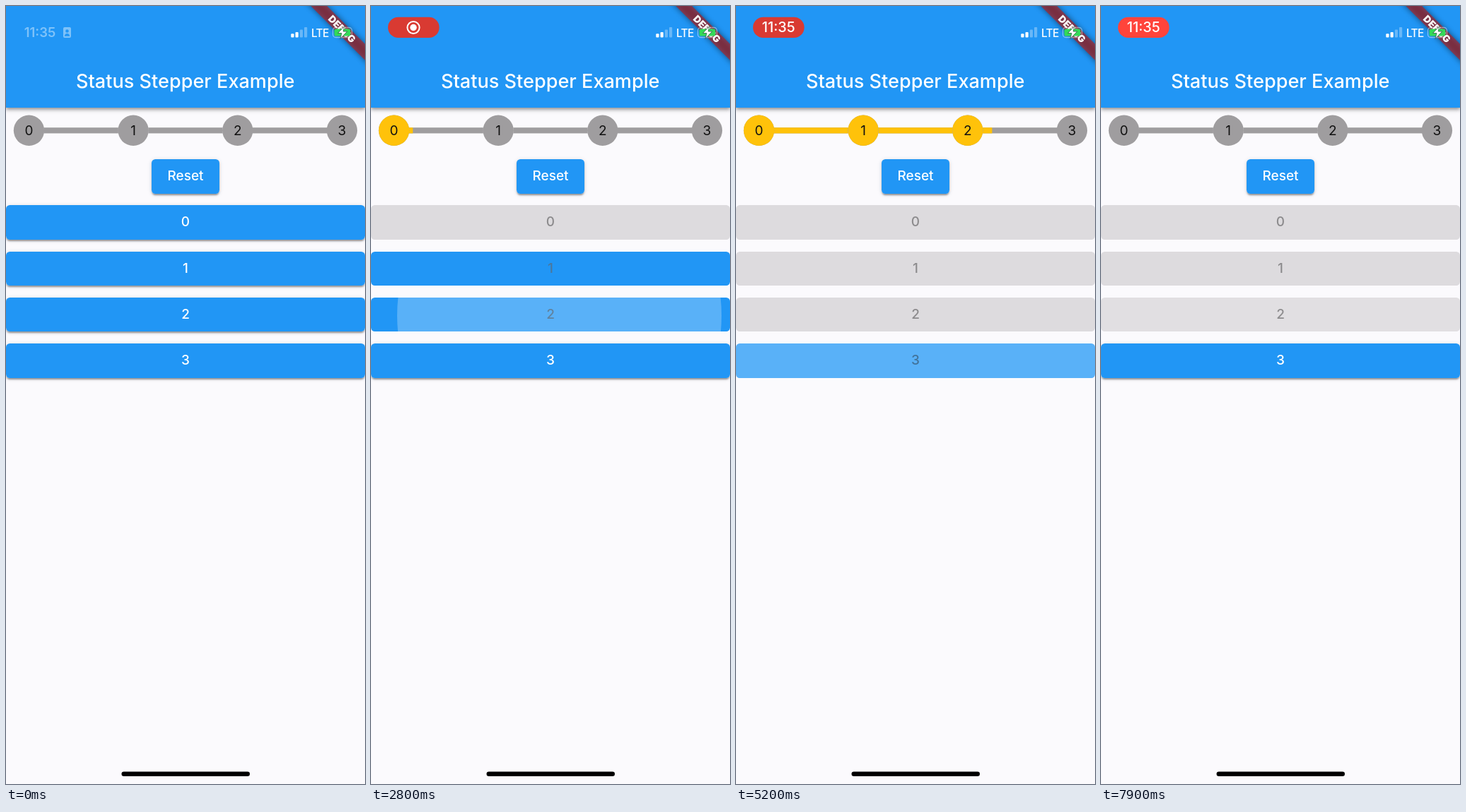
Recreate the animation shown at these times as an HTML page. Size 508x1102 px, loop 8 s.

```html
<!DOCTYPE html>
<html lang="en">
<head>
<meta charset="utf-8">
<title>Status Stepper Example</title>
<style>
html, body { margin: 0; width: 100%; height: 100%; overflow: hidden; background: #fbfafd; }
#stage { position: absolute; left: 0; top: 0; width: 508px; height: 1102px; overflow: hidden; font-family: Inter, Roboto, sans-serif; }
#bar { position: absolute; left: 0; top: 0; width: 508px; height: 143.5px; background: #2196f5; box-shadow: 0 2px 5px rgba(0,0,0,.36), 0 4px 6px rgba(0,0,0,.12); }
svg { position: absolute; left: 0; top: 0; }
.shade, .btn { position: absolute; height: 48.8px; border-radius: 5.4px; }
.shade { box-shadow: 0 3px 2px -1px rgba(0,0,0,.24), 0 2px 3px rgba(0,0,0,.16), 0 1px 6px rgba(0,0,0,.12); }
.btn { overflow: hidden; background: #2196f5; color: #fff; font-size: 19px; font-weight: 500; line-height: 48.8px; text-align: center; }
.ink { position: absolute; border-radius: 50%; background: #fff; opacity: 0; }
.btn span { position: relative; }
</style>
</head>
<body>
<div id="stage">
  <div id="bar"></div>
  <svg id="art" width="508" height="1102" viewBox="0 0 508 1102" font-family="Inter, Roboto, sans-serif">
    <defs>
      <filter id="soft" x="-20%" y="-100%" width="140%" height="300%"><feGaussianBlur stdDeviation="4"/></filter>
    </defs>
    <text x="253.7" y="115.5" font-size="27.1" font-weight="500" fill="#fff" text-anchor="middle">Status Stepper Example</text>
    <g id="steps"></g>
    <rect x="163.5" y="1084.5" width="181.5" height="6.6" rx="3.3"/>

    <g transform="translate(508 0) rotate(45)">
      <rect x="-90" y="38" width="180" height="16.2" opacity=".5" filter="url(#soft)"/>
      <rect x="-90" y="38" width="180" height="16.2" fill="#b71c1c" fill-opacity=".627"/>
      <text y="51" font-size="13.8" font-weight="900" fill="#fff" text-anchor="middle">DEBUG</text>
    </g>

    <g fill="#fff">
      <rect x="403.3" y="39.3" width="4.2" height="5.2" rx="1"/>
      <rect x="409.5" y="37" width="4.2" height="7.5" rx="1"/>
      <rect x="415.8" y="33.4" width="4.2" height="11.1" rx="1" opacity=".32"/>
      <rect x="422" y="30" width="4.2" height="14.5" rx="1" opacity=".32"/>
      <text x="432" y="43.6" font-size="15.4" font-weight="500" letter-spacing="-.7">LTE</text>
    </g>
    <rect x="462.5" y="30.5" width="27" height="14" rx="4.3" fill="none" stroke="#fff" stroke-opacity=".45" stroke-width="1.3"/>
    <rect x="464.6" y="32.5" width="22.8" height="10" rx="2.6" fill="#34d958"/>
    <path d="M479 28.5L469.5 38.5H475L473 46.5L482.8 36H477.2Z" fill="#fff" stroke="#2b6048" stroke-width=".8"/>

    <g id="clock" fill="#fff">
      <text x="48" y="44" font-size="18.5" font-weight="600" text-anchor="middle">11:35</text>
      <path fill-rule="evenodd" d="M83 30H90Q92 30 92 32V43Q92 45 90 45H83Q81 45 81 43V32Q81 30 83 30ZM86.5 33.2A2.3 2.3 0 1 0 86.5 37.8A2.3 2.3 0 1 0 86.5 33.2ZM82.8 42.8H90.2Q89.8 39 86.5 39T82.8 42.8Z"/>
    </g>
    <g id="pill">
      <rect id="pillBg" x="24" y="15.8" width="72.6" height="29.2" rx="14.6"/>
      <g id="rec">
        <circle cx="60" cy="30.5" r="8.6" fill="none" stroke="#fff" stroke-width="2"/>
        <circle cx="60" cy="30.5" r="4.7" fill="#fff"/>
      </g>
      <text id="pillTime" x="60.2" y="37.2" font-size="19.8" font-weight="500" fill="#fff" text-anchor="middle">11:35</text>
    </g>
  </svg>
</div>
<script>
const LOOP = 8000, FILL = 400, BACK = 6546, RESET = 6440;
const GREY = '#9f9d9f', AMBER = '#ffc20a';
const $ = id => document.getElementById(id);
const clamp = v => Math.max(0, Math.min(1, v));
const ramp = (t, start, length) => clamp((t - start) / length);

// Stepper: circles and connectors, each filled from the left
const steps = $('steps'), parts = [];
function svg(tag, attrs, parent) {
  const el = document.createElementNS('http://www.w3.org/2000/svg', tag);
  for (const k in attrs) el.setAttribute(k, attrs[k]);
  parent.append(el);
  return el;
}
function addPart(tag, shape, x, width, start) {
  const id = 'cut' + parts.length;
  const clip = svg('clipPath', { id }, steps);
  const cut = svg('rect', { x, y: 150, width: 0, height: 52 }, clip);
  svg(tag, { ...shape, fill: GREY }, steps);
  svg(tag, { ...shape, fill: AMBER, 'clip-path': `url(#${id})` }, steps);
  parts.push({ cut, width, start });
}
const nodeStart = [1390, 3180, 3980, 5550], lineStart = [2780, 3580, 5150];
for (let i = 0; i < 4; i++) {
  const cx = 32.5 + i * 147.63, r = 21.7;
  if (i < 3) addPart('rect', { x: cx + r - .5, y: 172.2, width: 105.2, height: 8.2 }, cx + r - .5, 105.2, lineStart[i]);
  addPart('circle', { cx, cy: 176.3, r }, cx - r, 2 * r, nodeStart[i]);
  svg('text', { x: cx, y: 183, 'font-size': 19, fill: '#111', 'text-anchor': 'middle' }, steps).textContent = i;
}

// Buttons
function div(cls, css, parent) {
  const el = document.createElement('div');
  el.className = cls;
  Object.assign(el.style, css);
  parent.append(el);
  return el;
}
function addButton(label, left, top, width) {
  const box = { left: left + 'px', top: top + 'px', width: width + 'px' };
  const shade = div('shade', box, $('stage'));
  const el = div('btn', box, $('stage'));
  const ink = div('ink', {}, el);
  const text = document.createElement('span');
  text.textContent = label;
  el.append(text);
  return { shade, el, ink, text };
}
const reset = addButton('Reset', 206, 217.3, 96);
const buttons = [0, 1, 2, 3].map(i => addButton(i, 0, 282.4 + i * 65.15, 508));
const taps = [
  { b: buttons[0], t: 1280 }, { b: buttons[2], t: 2665 }, { b: buttons[3], t: 5010 },
  { b: reset, t: RESET }, { b: buttons[2], t: 7540 }
];
const disabledAt = [[1280, 7540], [2665, 7540], [2665, 7540], [5010, LOOP]];

function drawInk(tap, t) {
  const age = t - tap.t, small = tap.b === reset;
  const p = ramp(age, 16, 225), e = 1 - (1 - p) ** 2.2;
  const r = small ? 12 + 50 * e : 30 + 245 * e;
  const x = small ? 48 : 320 - 66 * e, y = small ? 24.4 : 32 - 7.6 * e;
  Object.assign(tap.b.ink.style, {
    left: x - r + 'px', top: y - r + 'px', width: 2 * r + 'px', height: 2 * r + 'px',
    opacity: age < 16 ? 0 : .25 * (1 - ramp(age, 250, 200))
  });
}

function drawButton(b, i, t) {
  const on = t >= RESET ? disabledAt[i][1] : disabledAt[i][0];
  let p = ramp(t, on, 200), lift = 1 - ramp(t, on, 120);
  const grey = p === 1;
  if (t >= RESET && t < RESET + 200) {
    p = 1 - ramp(t, RESET, 200);
    lift = 1 - p;
  }
  const c = 255 - 227 * p;
  b.text.style.color = `rgba(${c},${c},${c},${1 - .58 * p})`;
  b.el.style.background = grey ? '#dddbde' : '#2196f5';
  b.shade.style.opacity = lift;
}

function drawStatus(t) {
  const show = ramp(t, 150, 300), swap = ramp(t, 2980, 250);
  const glow = Math.min(1, .956 + .13 * Math.cos(Math.PI * t / 1000));
  $('clock').setAttribute('opacity', .42 * (1 - ramp(t, 0, 250)));
  $('pill').setAttribute('opacity', show);
  $('pillBg').setAttribute('fill', `rgb(${[255, 68, 59].map(v => Math.round(v * glow))})`);
  $('rec').setAttribute('opacity', 1 - swap);
  $('pillTime').setAttribute('opacity', swap);
}

function draw(t) {
  for (const { cut, width, start } of parts) {
    const p = t < BACK ? ramp(t, start, FILL) : 1 - ramp(t, BACK, FILL);
    cut.setAttribute('width', width * p);
  }
  buttons.forEach((b, i) => drawButton(b, i, t));
  for (const { b } of taps) b.ink.style.opacity = 0;
  for (const tap of taps) if (t >= tap.t && t < tap.t + 460) drawInk(tap, t);
  drawStatus(t);
}

const began = performance.now();
function frame() {
  draw((performance.now() - began) % LOOP);
  requestAnimationFrame(frame);
}
frame();
</script>
</body>
</html>
```
